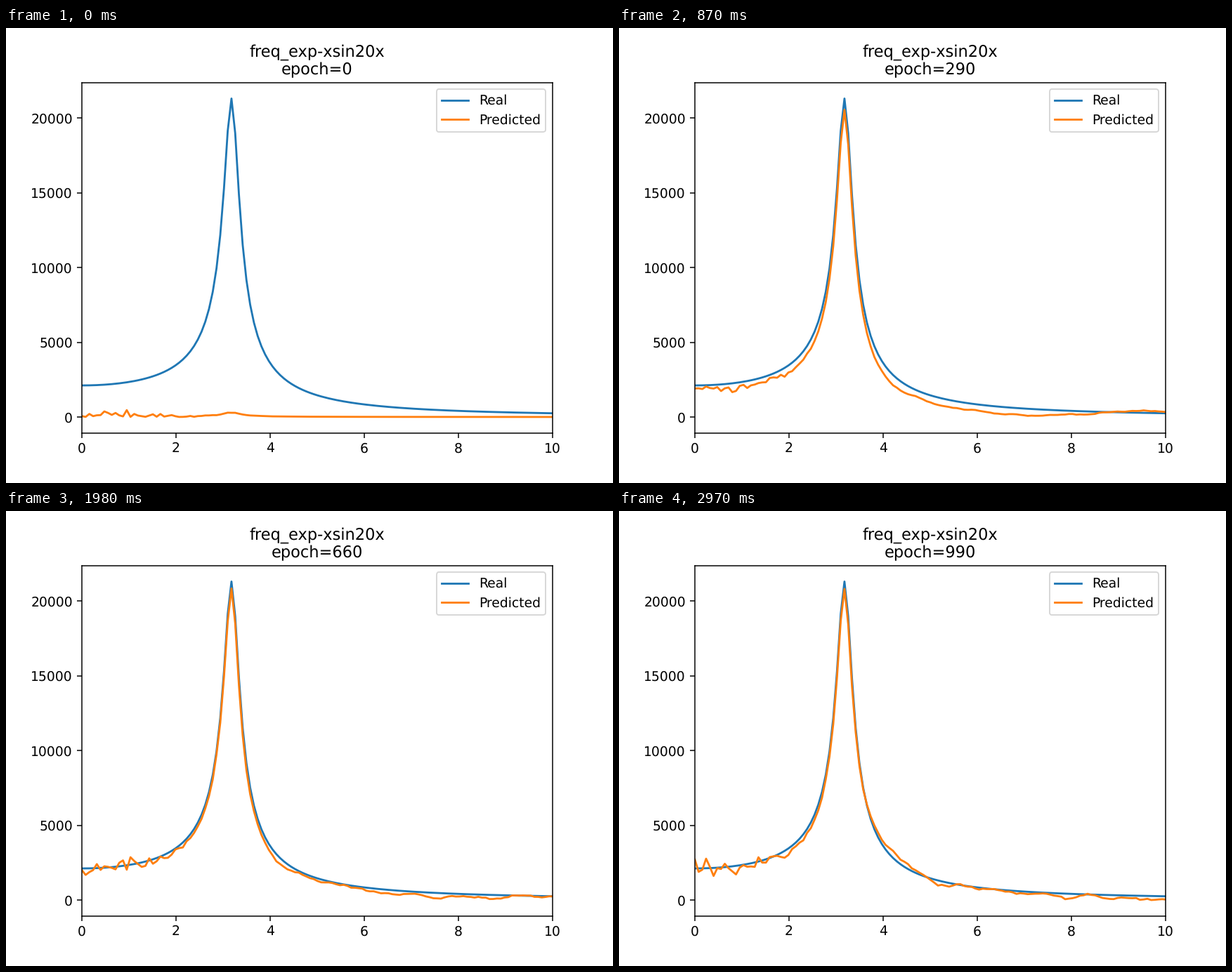
A matplotlib script that plays this animation: 864x648 px, repeating every 3 s.

```python
import numpy as np
import matplotlib.pyplot as plt
from matplotlib.animation import FuncAnimation

plt.rcParams["text.hinting"] = "none"

FRAMES, INTERVAL, EPOCHS_PER_FRAME = 100, 30, 10
WARMUP = 180  # epochs until the peak is learned
PEAK = 21296
UNIT = 47     # size of one error step on the y axis

# Spectrum of exp(-x) * sin(20x)
SAMPLES = 1000
x, dx = np.linspace(0, 4 * np.pi, SAMPLES, retstep=True)
bins = np.arange(128)
freq = np.fft.rfftfreq(SAMPLES, dx)[bins]
real = np.abs(np.fft.rfft(np.exp(-x) * np.sin(20 * x)))[bins]
real *= PEAK / real.max()

# Training error at a few moments: bias at each knot frequency, then roughness
KNOTS = [0.8, 3.2, 4.2, 5.2, 7.4, 9.6]
ERRORS = {
    0: (0, 0, 0, 0, 0, 0, 6),
    180: (-10, -26, -19, -19, -10, 6, 4),
    410: (-1, -3, -9, -2, -8, -1, 4),
    560: (0, -4, -4, 0, -5, -1, 3),
    750: (3, -14, -8, 0, -5, 1, 10),
    860: (-2, -4, 1, -5, -3, -2, 2),
    990: (-3, -10, 8, -2, -2, -4, 8),
}
LOW = np.exp(-(freq / 1.8) ** 2)


def noise(seed):
    """Sharp jitter at low frequencies and a slow wobble along the tail."""
    rng = np.random.default_rng(seed)
    jitter = LOW * rng.normal(size=bins.size)
    wobble = np.convolve(rng.normal(size=bins.size), np.ones(6) / 6 ** 0.5, "same")
    return jitter, 0.25 * wobble


def predict(epoch):
    columns = zip(*ERRORS.values())
    *bias, rough = [np.interp(epoch, list(ERRORS), c) for c in columns]
    u = min(epoch / WARMUP, 1)
    gain = 0.014 + 0.986 * u * u * (3 - 2 * u)
    jitter, wobble = noise(epoch)
    error = np.interp(freq, KNOTS, bias) + rough * (jitter + gain * wobble)
    return np.abs(gain * real + UNIT * error)


fig, ax = plt.subplots(figsize=(6.4, 4.8), dpi=135)
ax.plot(freq, real, label="Real")
line, = ax.plot(freq, predict(0), label="Predicted")
ax.set_xlim(0, 10)
ax.set_ylim(-0.05 * PEAK, 1.05 * PEAK)
ax.legend(loc="upper right")
title = ax.set_title("")


def update(frame):
    epoch = frame * EPOCHS_PER_FRAME
    line.set_ydata(predict(epoch))
    title.set_text(f"freq_exp-xsin20x\nepoch={epoch}")
    return line, title


anim = FuncAnimation(fig, update, frames=FRAMES, interval=INTERVAL, repeat=True)
plt.show()
```
